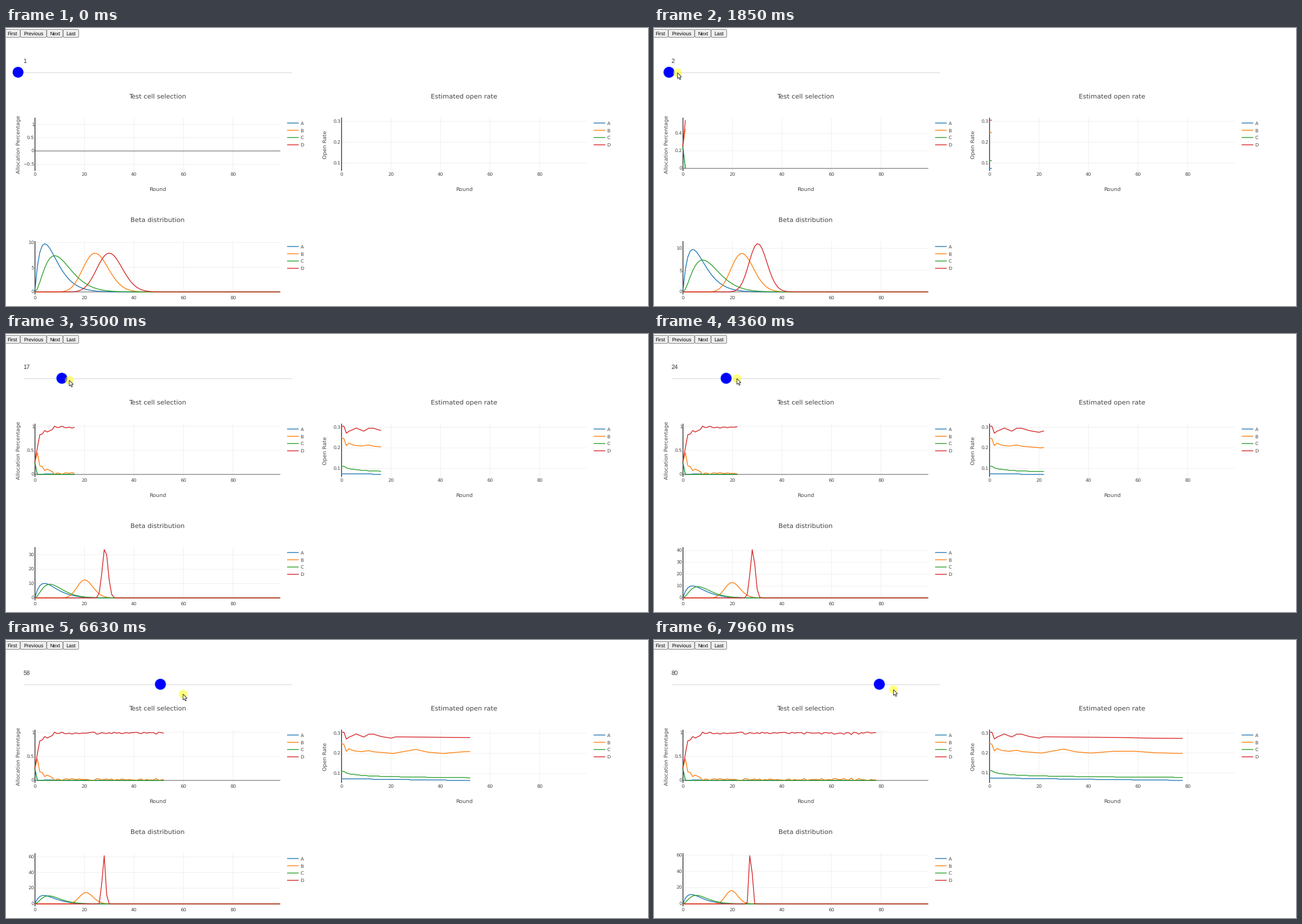
Recreate the animation shown at these times as a matplotlib script. Size 1135 by 493 pixels, loop 8 s.

```python
import math

import matplotlib.pyplot as plt
import numpy as np
from matplotlib.animation import FuncAnimation
from matplotlib.patches import Circle, FancyBboxPatch, Polygon

plt.rcParams["path.snap"] = False
plt.rcParams["text.hinting"] = "no_hinting"

W, H, DPI = 1135, 493, 64
LOOP, STEP = 8000, 50
PT = 72 / DPI  # points per pixel
COLORS = ["#1f77b4", "#ff7f0e", "#2ca02c", "#d62728"]
INK = "#444444"
DX = 4.38  # pixels per round on the charts
NOTCH = 4.785  # pixels per round on the slider


def curve(*points):
    """Straight segments through a few (x, y) points."""
    xs, ys = zip(*points)
    return lambda x: np.interp(x, xs, ys)


# ---------------------------------------------------------------- data

rounds = np.arange(80)
rng = np.random.default_rng(4)

# cell D soon takes nearly every mail; B gets most of the rest
share_d = curve((0, .25), (1, .55), (2, .82), (3, .84), (4, .91), (5, .88),
                (7, .93), (8, 1))(rounds)
share_d[9:] -= rng.poisson(1.5, 71) / 100
share_a = np.where(rounds == 0, .25, 0)
share_c = share_a.copy()
share_a[4:8] = .01
share_b = 1 - share_a - share_c - share_d
shares = [share_a, share_b, share_c, share_d]

# trials per cell: A and C only get a stray mail now and then
trials = [
    27 + (rounds + 2) // 15,
    27 + 100 * np.cumsum(np.append(share_b[1:], .01)),
    27 + np.floor(.8 + 2.6 * np.log(np.maximum(rounds, 1))),
    27 + 100 * np.cumsum(np.append(share_d[1:], .99)),
]
rates = [
    2 / trials[0],
    curve((0, .25), (1, .244), (2, .2105), (3, .223), (5, .213), (8, .209),
          (11, .214), (13, .208), (21, .2), (30, .22), (35, .206), (41, .2),
          (50, .209), (59, .209), (67, .2015), (79, .198))(rounds),
    3 / trials[2],
    curve((0, .305), (1, .305), (2, .271), (3, .28), (6, .296), (9, .281),
          (11, .295), (13, .295), (16, .2838), (20, .2755), (22, .282),
          (31, .2808), (52, .2784), (67, .2745), (79, .2738))(rounds),
]

grid_x = np.clip(np.arange(100) / 100, 1e-9, 1)


def beta_pdf(mean, n):
    a, b = mean * n, (1 - mean) * n
    norm = math.lgamma(n) - math.lgamma(a) - math.lgamma(b)
    return np.exp(norm + (a - 1) * np.log(grid_x)
                  + (b - 1) * np.log(1 - grid_x))


# -------------------------------------------------------------- motion

progress = curve((1260, 0), (1850, 1.1), (2880, 11.2), (3500, 16.2),
                 (4350, 22.2), (4600, 26.2), (5600, 31.4), (6300, 43.5),
                 (6600, 52.6), (7950, 78.8))
lead = curve((1260, 0), (1850, 15), (3500, 13), (4350, 19), (5600, 20.5),
             (6600, 40), (7950, 25))
height = curve((900, 77), (1850, 79.5), (3500, 82), (4350, 79), (5600, 81),
               (6600, 96), (7950, 88))


def knob_x(t):
    return 21.3 + NOTCH * progress(t)


def pointer(t):
    """Glide in from the lower right, then lead the knob."""
    away = max(0, (900 - t) / 800) ** 2
    return knob_x(t) + lead(t) + 1135 * away, height(t) + 430 * away


# --------------------------------------------------------------- stage

fig = plt.figure(figsize=(W / DPI, H / DPI), dpi=DPI, facecolor="white")
ax = fig.add_axes([0, 0, 1, 1])
ax.set_xlim(0, W)
ax.set_ylim(H, 0)
ax.axis("off")


def text(x, y, s, px, ha="center", color=INK, font="DejaVu Sans", **kw):
    kw.setdefault("va", "baseline")
    return ax.text(x, y, s, fontsize=px * PT, ha=ha, color=color,
                   family=font, **kw)


def line(xs, ys, color, px, z):
    return ax.plot(xs, ys, color=color, lw=px * PT, zorder=z,
                   solid_capstyle="butt", solid_joinstyle="round")[0]


class Chart:
    """Line chart whose y axis rescales to the data."""

    def __init__(self, x, y, title, x_title="", y_title=""):
        self.x, self.y = x, y
        right, low = x + 434, y + 94.5
        text(x + 217, y - 34, title, 11.45)
        if x_title:
            text(x + 217, y + 130, x_title, 9.45)
            text(x - 28.5, y + 47.5, y_title, 9.45, va="center", rotation=90)
        for r in range(0, 100, 20):
            if r:
                line([x + r * DX] * 2, [y, low], "#eeeeee", 0.9, 1)
            text(x + r * DX, y + 103.5, str(r), 8.3)
        line([x + 0.3] * 2, [y, low], "#333333", 1.4, 3)
        self.zero = line([x, right], [0, 0], INK, 0.9, 2)
        self.ticks = [(line([x, right], [0, 0], "#eeeeee", 0.9, 1),
                       text(x - 1, 0, "", 8.3, ha="right"))
                      for _ in range(8)]
        self.curves = []
        for i, color in enumerate(COLORS):
            ly = y + 9.5 + 12.9 * i
            line([x + 446, x + 466.5], [ly, ly], color, 1.4, 2)
            text(x + 469.5, ly + 3.2, "ABCD"[i], 8.3, ha="left")
            self.curves.append(line([], [], color, 1.4, 4))

    def update(self, series, lo, hi):
        scale = 85.5 / (hi - lo)

        def to_y(v):
            return self.y + 90 - (v - lo) * scale

        for trace, vals in zip(self.curves, series):
            trace.set_data(self.x + DX * np.arange(len(vals)), to_y(vals))

        # tick step rounded up to 1, 2 or 5 times a power of ten
        rough = 94.5 / scale / 4.75
        power = 10 ** math.floor(math.log10(rough))
        step = next(m * power for m in (1, 2, 5, 10) if m * power >= rough)
        first = math.ceil((lo - 4.5 / scale) / step)
        self.zero.set_visible(False)
        for k, (grid, name) in enumerate(self.ticks, first):
            ty = to_y(k * step)
            inside = ty >= self.y
            grid.set_visible(inside and k != 0)
            name.set_visible(inside)
            if not inside:
                continue
            grid.set_ydata([ty, ty])
            name.set_y(ty + 3.2)
            name.set_text(f"{round(k * step, 6):g}".replace("-", "\u2212"))
            if k == 0:
                self.zero.set_visible(True)
                self.zero.set_ydata([ty, ty])


for left, width, name in ((-3, 28, "First"), (25.5, 46, "Previous"),
                          (72, 28.5, "Next"), (101, 27.5, "Last")):
    ax.add_patch(FancyBboxPatch((left, 2.5), width, 14,
                                boxstyle="round,pad=0,rounding_size=2",
                                fc="#efefef", ec="#767676", lw=0.9 * PT))
    text(left + width / 2, 12.5, name, 9, color="black",
         font="Liberation Sans")

line([31, 505.5], [79.2, 79.2], "#dddddd", 1.3, 1)
glow = ax.add_patch(Circle((0, 0), 10.8, fc="#d3ecfb", ec="none", zorder=5))
knob = ax.add_patch(Circle((0, 0), 9.6, fc="#0000ff", ec="none", zorder=6))
value = text(30.5, 62.2, "", 10.8, ha="left", color="#333333",
             font="Liberation Sans")

cells = Chart(51, 159, "Test cell selection", "Round",
              "Allocation Percentage")
opens = Chart(593, 159, "Estimated open rate", "Round", "Open Rate")
betas = Chart(51, 378, "Beta distribution")

ARROW = np.array([(0, 0), (0, 10.3), (2.3, 8.2), (4, 12), (5.7, 11.2),
                  (4.1, 7.6), (7.2, 7.3)])
halo = ax.add_patch(Circle((0, 0), 7.7, fc="#ffff00", ec="none", alpha=0.5,
                           zorder=8))
arrow = ax.add_patch(Polygon(ARROW, closed=True, fc="white", ec="#222222",
                             lw=0.9 * PT, zorder=9))


def draw(i):
    t = i * STEP
    n = int(progress(t)) + 1

    px, py = pointer(t)
    halo.center = (px, py)
    arrow.set_xy(ARROW + (px, py))
    for part in (halo, arrow):
        part.set_visible(t >= 150)

    knob.center = glow.center = (knob_x(t), 78.5)
    glow.set_visible(t >= 900)
    dragged = round((px - 31) / 4.88) if t >= 900 else 1
    value.set_text(str(max(1, dragged)))

    # a single point gets a range of one unit either side
    lo, hi = (-0.655, 1.155) if n == 1 else (0, share_d[:n].max())
    cells.update([s[:n] for s in shares], lo, hi)
    opens.update([r[:n] for r in rates], rates[0][n - 1], rates[3][0])
    pdfs = [beta_pdf(r[n - 1], c[n - 1]) for r, c in zip(rates, trials)]
    betas.update(pdfs, 0, max(p.max() for p in pdfs))
    return []


anim = FuncAnimation(fig, draw, frames=LOOP // STEP, interval=STEP,
                     init_func=lambda: draw(0), repeat=True, repeat_delay=0)
plt.show()
```
